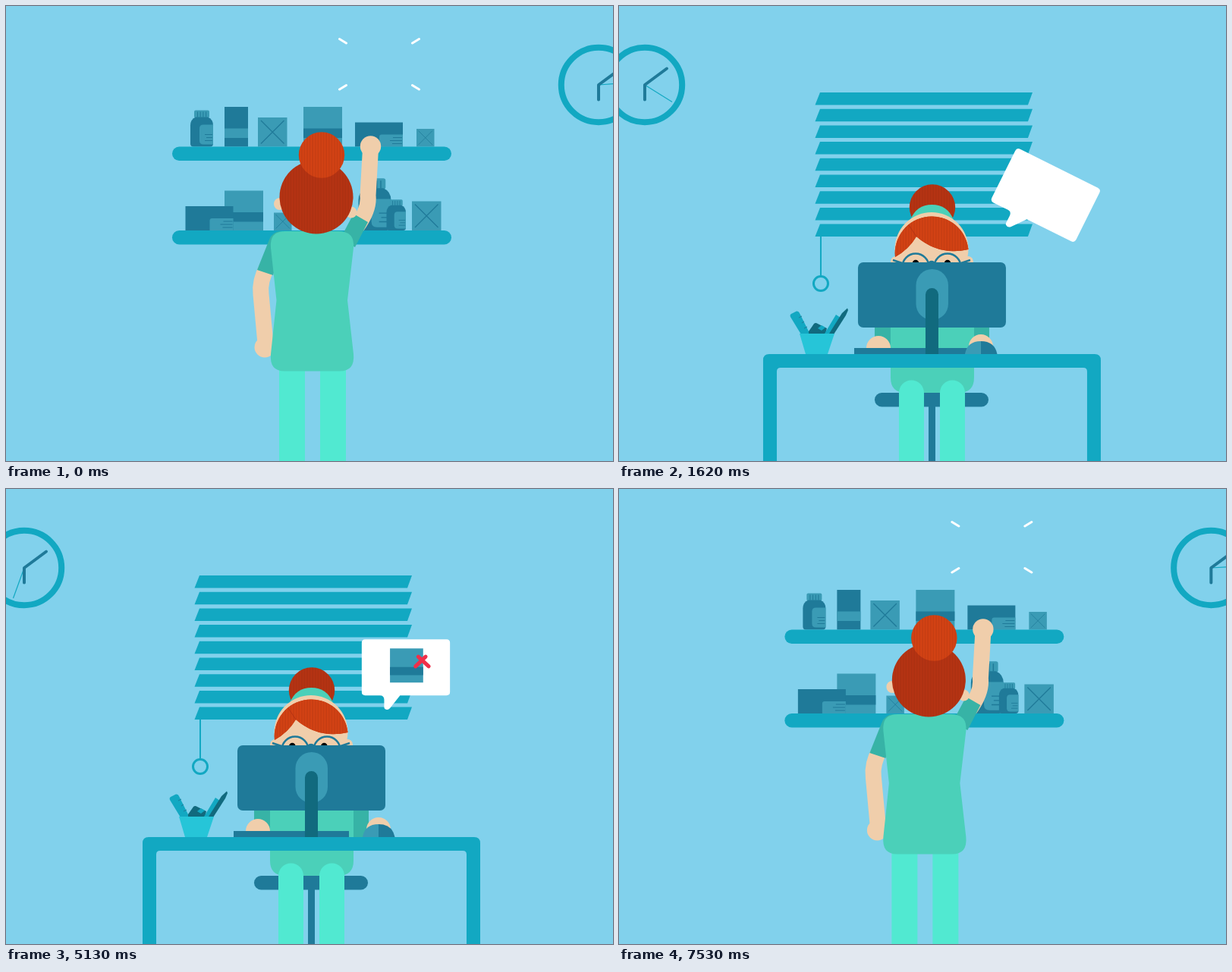
These frames come from a looping animation (800x600 px, 7560 ms). An HTML page:

```html
<!DOCTYPE html>
<html lang="en">
<head>
<meta charset="utf-8">
<title>Stock check</title>
<style>
html, body { margin: 0; width: 100%; height: 100%; overflow: hidden; background: #81d1ec; }
svg { display: block; width: 100vw; height: 100vh; }
.teal { fill: #12a8c2; }
.dark { fill: #1f7a99; }
.mid { fill: #3a9bb5; }
.deep { fill: #116a7e; }
.skin { fill: #f0ceab; }
.top { fill: #4bd0b9; }
.sleeve { fill: #37b3a6; }
.leg { fill: #51e9d1; }
.hair { fill: #d34214; }
.hair2 { fill: #b53313; }
.line { fill: none; stroke: #1f7a99; }
.arm { fill: none; stroke: #f0ceab; stroke-width: 21; }
.round { stroke-linecap: round; stroke-linejoin: round; }
</style>
</head>
<body>
<svg viewBox="0 0 800 600">
<defs>
  <pattern id="strands" width="3.6" height="10" patternUnits="userSpaceOnUse">
    <path d="M1 0V10" stroke="#7d2008" stroke-opacity=".24"/>
  </pattern>
  <!-- Goods stand on y = 0 -->
  <g id="bottle">
    <rect class="mid" x="5" y="-48" width="20" height="10" rx="2"/>
    <path class="line" d="M9.500-46V-39M13.200-46V-39M16.900-46V-39M20.600-46V-39"/>
    <path class="dark" d="M0-4V-28Q0-36 7-39H23Q30-36 30-28V-4Q30 0 26 0H4Q0 0 0-4Z"/>
    <path class="mid" d="M30-29V-3H17Q12-3 12-8V-24Q12-29 17-29Z"/>
    <path class="line" d="M19-16H29M21-12H29M19-8H29"/>
  </g>
  <g id="crate">
    <rect class="mid" y="-38.500" width="38.500" height="38.500"/>
    <path class="line" d="M4-34.500L34.500-4M34.500-34.500L4-4" stroke-width="1.200"/>
  </g>
  <g id="carton">
    <rect class="mid" y="-52.500" width="51" height="52.500"/>
    <rect class="dark" y="-24" width="51" height="12.500"/>
  </g>
  <g id="pack">
    <rect class="dark" y="-32" width="63" height="32"/>
    <path class="mid" d="M63-16V0H32V-13Q32-16 35-16Z"/>
    <path class="line" d="M50-12H62M46-8H62M49-4H62" stroke-width="1.200"/>
  </g>
  <path id="slat" class="teal" d="M255 114H535L529 130.500H248.500Z"/>
</defs>

<rect width="800" height="600" fill="#81d1ec"/>
<g id="world">
  <g transform="translate(781 104)">
    <circle r="49.200" fill="none" stroke="#12a8c2" stroke-width="8"/>
    <path id="second" d="M0 0H42.500" stroke="#12a8c2" stroke-width="1.200"/>
    <path class="line round" d="M0 19.500V0L29-21.500" stroke-width="4"/>
  </g>

  <g id="store">
    <g transform="translate(0 185.500)">
      <use href="#bottle" x="243"/>
      <rect class="dark" x="288" y="-52.500" width="31" height="52.500"/>
      <rect class="mid" x="288" y="-24" width="31" height="12.500"/>
      <use href="#crate" x="332"/>
      <use href="#carton" x="392"/>
      <use href="#pack" x="460"/>
      <use href="#crate" transform="translate(541) scale(.61)"/>
      <rect class="teal" x="219" width="368" height="18.500" rx="9.250"/>
    </g>
    <g transform="translate(0 296)">
      <use href="#carton" x="288"/>
      <use href="#pack" x="236.500"/>
      <use href="#crate" transform="translate(353) scale(.61)"/>
      <use href="#bottle" transform="translate(464.500) scale(1.430)"/>
      <use href="#bottle" transform="translate(501.500) scale(.850)"/>
      <use href="#crate" x="535"/>
      <rect class="teal" x="219" width="368" height="18.500" rx="9.250"/>
    </g>
    <path id="sparks" class="round" d="M439.500 43.500L448.500 49M535.500 49L544.500 43.500M439.500 110L448.500 104.500M535.500 104.500L544.500 110" stroke="#fff" stroke-width="3"/>
    <path class="leg" d="M360 478H394V600H360ZM414 478H448V600H414Z"/>
    <path class="arm" d="M344 345Q334 362 336 380L342 445"/>
    <circle class="skin" cx="341" cy="450" r="13.500"/>
    <path class="sleeve" d="M362 297Q351 298 347 308L331 348L352 355L358 335Z"/>
    <path id="reach" class="arm"/>
    <circle id="palm" class="skin" r="13.700"/>
    <path id="cuff" class="sleeve"/>
    <path class="top" d="M368 297H438Q460 297 458 319L450 388L458 459Q460 481.500 440 481.500H367Q347 481.500 349 459L356.500 388L349 319Q347 297 368 297Z"/>
    <g id="back">
      <circle class="skin" cx="361" cy="261" r="8"/>
      <circle class="skin" cx="455" cy="272" r="7.500"/>
      <circle class="hair2" cx="409" cy="252" r="48.500"/>
      <circle cx="409" cy="252" r="48.500" fill="url(#strands)"/>
      <circle class="hair" cx="416" cy="196.500" r="30.200"/>
      <circle cx="416" cy="196.500" r="30.200" fill="url(#strands)"/>
    </g>
  </g>

  <g transform="translate(757)">
    <g id="blinds"></g>
    <path d="M256 304V356" stroke="#12a8c2" stroke-width="2"/>
    <circle cx="256" cy="366" r="9.500" fill="none" stroke="#12a8c2" stroke-width="3"/>

    <rect class="dark" x="327" y="510" width="150" height="18.500" rx="9.250"/>
    <rect class="dark" x="398" y="526" width="9" height="74"/>
    <path class="top" d="M348 410H458V490Q458 510 438 510H368Q348 510 348 490Z"/>
    <path class="sleeve" d="M327 410H348V459H327ZM458 410H478V459H458Z"/>
    <path class="leg" d="M359 600V510a16.500 16.500 0 0 1 33 0V600ZM413 600V510a16.500 16.500 0 0 1 33 0V600Z"/>

    <circle class="hair2" cx="403" cy="265.500" r="30.200"/>
    <circle cx="403" cy="265.500" r="30.200" fill="url(#strands)"/>
    <path class="top" d="M374 282Q382 262 402.500 262Q423 262 431 282L402 300Z"/>
    <circle class="skin" cx="355" cy="337" r="7"/>
    <circle class="skin" cx="450" cy="337" r="7"/>
    <circle class="skin" cx="402" cy="320.500" r="48.500"/>
    <path id="fringe" class="hair" d="M354 331A48.500 48.500 0 1 1 450.500 321Q412 330 382 304Q372 321 354 331Z"/>
    <use href="#fringe" style="fill:url(#strands)"/>
    <path d="M354 331A48.500 48.500 0 1 1 450.500 321Q412 330 382 304Q372 321 354 331Z" fill="url(#strands)"/>
    <path d="M372 289L382 304" stroke="#b53313"/>
    <g id="eyes"><circle cx="381" cy="339" r="4.200"/><circle cx="423" cy="339" r="4.200"/></g>
    <g class="line" stroke-width="2.500">
      <circle cx="381" cy="344" r="17.500"/>
      <circle cx="423" cy="344" r="17.500"/>
      <path d="M398 339Q402 335 406 339M363 339L351 335M441 339L453 335"/>
    </g>

    <path class="teal" d="M217 406L224 402.500Q227 402 228 405L242 433H230L216 410Q215 407 217 406Z"/>
    <path class="line" d="M231 409L227 411M234 416L231 418M238 423L234 425"/>
    <path class="deep" d="M240 429L247 419Q249 417 252 419L264 425L262 433H240Z"/>
    <path class="teal" d="M252 425L257 421L262 424L257 428ZM261 432L276 407L282 411L269 433Z"/>
    <path class="deep" d="M267 432L284 405L291 398.500L292 401L289 408L273 433Z"/>
    <path d="M228 432H274L265 459H236Z" fill="#26c5d8"/>

    <rect class="dark" x="300" y="451" width="152" height="9"/>
    <path class="skin" d="M316 451a16 16 0 0 1 32 0Z"/>
    <g id="mouse">
      <circle class="skin" cx="467" cy="449" r="16"/>
      <path class="mid" d="M446 459Q449 442 467 442V459Z"/>
      <path class="dark" d="M467 442Q485 442 488.500 459H467Z"/>
    </g>
    <rect class="dark" x="305" y="338" width="195" height="86" rx="7"/>
    <rect class="mid" x="381.500" y="347" width="42.500" height="67" rx="21.250"/>
    <path class="deep" d="M394 459V380.500a8.500 8.500 0 0 1 17 0V459Z"/>
    <path class="teal" d="M180 600V467Q180 459 188 459H617Q625 459 625 467V600H607V482Q607 477 602 477H203Q198 477 198 482V600Z"/>

    <g id="bubble">
      <path d="M474 200H579Q583.500 200 583.500 204.500V268Q583.500 272.500 579 272.500H519L506 289Q503 292.500 499.500 290Q498 288.500 498.500 285V278Q498.500 272.500 493 272.500H474Q469.500 272.500 469.500 268V204.500Q469.500 200 474 200Z" fill="#fff"/>
      <g id="found"><use href="#bottle" transform="translate(513.500 255) scale(.860)"/></g>
      <path id="tick" class="round" d="M533.500 222L541.500 229L557.500 211.500" fill="none" stroke="#4bd0b9" stroke-width="5"/>
      <g id="lacking"><use href="#carton" transform="translate(506 256) scale(.840)"/></g>
      <path id="cross" class="round" d="M542.500 222.500L556 235M552 222.500L539 235" stroke="#f0304a" stroke-width="5"/>
    </g>
  </g>
</g>
</svg>
<script>
const LOOP = 7560, WIDTH = 757;
const $ = id => document.getElementById(id);
const clamp = x => Math.min(1, Math.max(0, x));
const part = (t, from, to) => clamp((t - from) / (to - from));
const smooth = u => u * u * (3 - 2 * u);
const mix = (a, b, k) => a + (b - a) * k;
const set = (id, name, value) => $(id).setAttribute(name, value);
const move = (id, value) => set(id, "transform", value);

for (let i = 0; i < 9; i++) {
  const slat = document.createElementNS("http://www.w3.org/2000/svg", "use");
  slat.setAttribute("href", "#slat");
  slat.setAttribute("y", i * 21.7);
  $("blinds").append(slat);
}

// Damped swing after the camera arrives
function swing(ms, size) {
  const s = ms / 1000;
  return size * Math.sin(2 * Math.PI * s) * Math.exp(-3 * s);
}

function camera(t) {
  if (t < 930) return WIDTH * part(t, 300, 930) ** 3;
  if (t < 5175) return WIDTH + swing(t - 930, 85);
  const arrive = 5940;
  if (t < arrive) return WIDTH * (1 - part(t, 5175, arrive) ** 1.5);
  return 0.5 * part(t, arrive, 6600) - swing(t - arrive, 30);
}

// Scale about a point, with a little overshoot
function grow(u) {
  const v = u - 1;
  return u <= 0 ? 0 : 1 + 2.7 * v ** 3 + 1.7 * v * v;
}
const scaleAt = (x, y, s) => `translate(${x} ${y}) scale(${s}) translate(${-x} ${-y})`;

function reach(k) {
  const x = mix(480.5, 466.5, k), y = mix(185, 181, k);
  const bend = mix(479, 471, k);
  set("reach", "d", `M${mix(463, 461, k)} 290Q${bend} 268 ${bend - 2} 250L${x} ${y + 3}`);
  set("palm", "cx", x);
  set("palm", "cy", y);
  set("cuff", "d", `M${mix(458, 456, k)} 274L${mix(477, 473, k)} ${mix(285, 281, k)}L${mix(460, 456, k)} 318L440 308Z`);
  move("back", `rotate(${2 * k} 409 295)`);
}

function sparks(t) {
  const out = part(t, 30, 270), born = part(t, 6780, 7200);
  const early = t < 3000;
  const s = early ? 1 + 0.45 * smooth(out) : grow(born);
  move("sparks", scaleAt(492, 76.7, s));
  set("sparks", "opacity", early ? 1 - out : clamp(born * 5));
}

function bubble(t) {
  const age = Math.max(0, t - 1440) / 1000;
  const turn = 75 * Math.exp(-3.1 * age) * Math.cos(5 * age);
  const leave = part(t, 5100, 5280);
  const s = grow(part(t, 1440, 1710)) * (1 + 0.35 * leave - 1.35 * leave * leave);
  move("bubble", `translate(502 291) rotate(${turn}) scale(${Math.max(0, s)}) translate(-502 -291)`);

  const gone = 1 - smooth(part(t, 3960, 4080));
  move("found", scaleAt(527, 236, grow(part(t, 2340, 2610)) * gone));
  move("tick", scaleAt(546, 221, grow(part(t, 3060, 3300)) * gone));
  move("lacking", scaleAt(527.5, 235, grow(part(t, 4080, 4320))));
  move("cross", scaleAt(547.5, 229, grow(part(t, 4650, 4890))));
}

function draw(t) {
  move("world", `translate(${-camera(t)})`);
  move("second", `rotate(${-4 + t * 0.0222 + (t < 5450 ? 0 : 193.5)})`);
  reach(t < 5000 ? 0 : 1 - smooth(part(t, 5880, 6700)));
  sparks(t);
  bubble(t);
  const slide = smooth(part(t, 4080, 4440));
  move("mouse", `translate(${24 * slide})`);
  move("eyes", `translate(${-3.700 * slide})`);
}

const start = performance.now();
function tick() {
  draw((performance.now() - start) % LOOP);
  requestAnimationFrame(tick);
}
tick();
</script>
</body>
</html>
```
